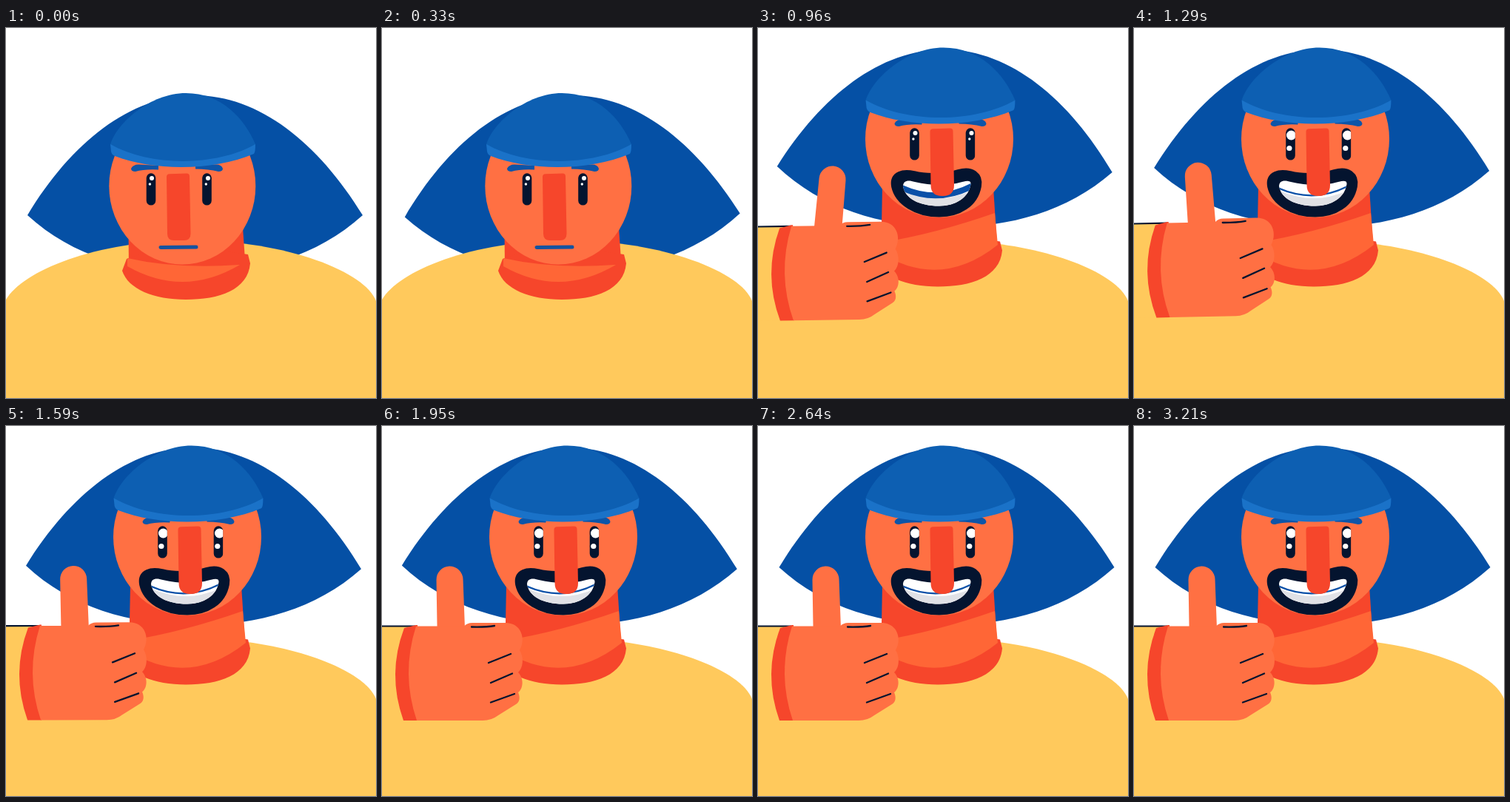
These frames come from a looping animation (500x500 px, 3.24 s). An HTML page:

```html
<!DOCTYPE html>
<html lang="en">
<head>
<meta charset="utf-8">
<title>Thumbs up</title>
<style>
  html, body { margin: 0; width: 100%; height: 100%; overflow: hidden; background: #fff; }
  svg { display: block; width: 100%; height: 100%; }
</style>
</head>
<body>
<svg viewBox="0 0 500 500" fill="none" stroke-linecap="round" stroke-linejoin="round">
  <defs>
    <clipPath id="eyeShape">
      <rect x="189.7" y="196.3" width="12.6" height="43.2" rx="6.3"/>
      <rect x="265.2" y="196.3" width="12.6" height="43.2" rx="6.3"/>
    </clipPath>
    <clipPath id="teethShape">
      <path d="M196 214C196 206 203 205 212 208C232 213 252 213 268 210C282 206 288 205 287.5 211C285 229 267 240.5 245 240.5C217 240.5 199 230 196 214Z"/>
    </clipPath>
  </defs>

  <path id="hair" fill="#0550a5" d="M29 253C88 155 168 91 255 91S422 155 482 253C420 309 340 331 255 331S90 309 29 253Z"/>
  <path fill="#ffc95c" d="M0 367C22 329 120 287 250 287S486 330 500 369V500H0Z"/>
  <path id="neck" fill="#f6462b"/>
  <path id="collar" fill="#f6462b" d="M163 312L157 328C165 353 200 367 243 367C288 367 327 354 330 318L327 306L300 302H190Z"/>
  <path id="neckLight" fill="#ff6636"/>
  <ellipse id="face" fill="#ff7043"/>

  <g id="features">
    <g fill="#0d55a8">
      <path d="M169 190Q172 184 180 184.5L206 186V191.5Q187 190.5 175 194Q169 194 169 190Z"/>
      <path d="M293 190Q291 184 283 184.5L256 185V190.5Q274 190.5 287 194Q293 194 293 190Z"/>
    </g>
    <g clip-path="url(#eyeShape)">
      <path fill="#04142f" d="M185 190H285V245H185Z"/>
      <g fill="#fff">
        <circle class="glint" cx="197"/><circle class="spark" cx="194.4"/>
        <circle class="glint" cx="273"/><circle class="spark" cx="270.3"/>
      </g>
    </g>
    <path id="frown" stroke="#1453a0" stroke-width="5" d="M209 296.5L257 296"/>
  </g>

  <g id="smile">
    <path fill="#04142f" stroke="#04142f" stroke-width="16" d="M188 213C186 201 196 198 210 201C230 206 255 204 272 199C288 194 296 202 294 213C290 235 270 247.500 245 247.500C215 247.500 192 232 188 213Z"/>
    <g clip-path="url(#teethShape)">
      <path fill="#fff" d="M180 190H305V260H180Z"/>
      <path fill="#e0e1e6" d="M180 211Q243 249 305 211V260H180Z"/>
      <path id="lip" stroke="#0a50a8" d="M190 214Q243 240 294 211"/>
    </g>
  </g>

  <path id="nose" fill="#f6462b"/>

  <g id="hat">
    <path fill="#1a72c8" d="M141 157L142 167Q143 171.500 147 173C200 193.500 280 193.500 335 170Q337 168 337 157Z"/>
    <path fill="#0d5fb2" d="M141 157C150 128 195 88 243 88S322 122 337 157C285 187 195 188 141 157Z"/>
  </g>

  <g id="arm">
    <path fill="#ffc95c" d="M-30 270.500H46V398H-30Z"/>
    <path stroke="#04142f" stroke-width="2.2" d="M-30 270.500H45"/>
    <path fill="#f6462b" d="M46 269L30 273Q6.5 335 29 398H48V269Z"/>
    <path id="thumb" fill="#ff7043" d="M75 300L73.5 208A18 18 0 0 1 109.500 207L113 300Z"/>
    <path fill="#ff7043" d="M46 270.500H111Q115 266 122 266H165C188 265 195 287 186 303C192 312 191 327 184 333C192 341 191 355 184 360C187 367 186 373 181 376L157 391Q148 398 136 398H47Q25.500 335 46 270.500Z"/>
    <path stroke="#04142f" stroke-width="2.3" d="M121 271.500Q140 272 152 270M144 320L174 308M147 347L176 334.500M147 373.500L179 362"/>
  </g>
</svg>

<script>
const LOOP = 3240;
const $ = id => document.getElementById(id);
const set = (id, attrs) => {
  for (const name in attrs) $(id).setAttribute(name, attrs[name]);
};
const setCircles = (selector, cy, r) => document.querySelectorAll(selector).forEach(c => {
  c.setAttribute('cy', cy);
  c.setAttribute('r', r);
});
const mix = (a, b, p) => a + (b - a) * p;

// Eased value at time t through [time, value] pairs.
function track(t, keys) {
  if (t <= keys[0][0]) return keys[0][1];
  for (let i = 1; i < keys.length; i++) {
    const [t0, v0] = keys[i - 1], [t1, v1] = keys[i];
    if (t < t1) {
      const u = (t - t0) / (t1 - t0);
      return mix(v0, v1, u * u * (3 - 2 * u));
    }
  }
  return keys[keys.length - 1][1];
}

function nosePath(p) {
  const r = mix(9, 15, p);
  const bottom = mix(287, 288, p);
  return `M217 201Q217 197.500 221 197.300L244 196.500Q248 196.500 248 200.500L249.500 ${bottom - r}` +
    `Q249.500 ${bottom} ${249.5 - r} ${bottom}L${218 + r} ${bottom}Q218 ${bottom} 218 ${bottom - r}Z`;
}

function draw(t) {
  const rise = track(t, [[740, 0], [930, 1]]);
  const shine = track(t, [[960, 0], [1140, 1]]);
  const sway = track(t, [[0, 0], [600, -1.1], [720, -1.1], [960, 1], [1290, 0.5], [1950, 0.6], [2500, 0]]);
  const m = (a, b) => mix(a, b, rise);

  set('hair', { transform: `translate(${-0.5 * rise} ${-62 * rise}) rotate(${sway} 255 95)` });
  set('neck', { d: `M${m(165.5, 168)} ${m(270, 215)}L166 ${m(330, 318)}H319L323 ${m(313, 293)}L${m(319, 318)} ${m(255, 215)}Z` });
  set('collar', { transform: `translate(0 ${-17.5 * rise})` });
  set('neckLight', {
    d: `M${m(164, 166)} ${m(311, 290)}Q${m(230, 240)} ${m(326, 278)} ${m(315, 320)} ${m(320, 250)}` +
       `L${m(316, 324)} ${m(320, 293)}Q${m(240, 246)} ${m(365, 355)} 164 ${m(322, 303)}Z`
  });
  set('face', { cx: m(238.3, 245), cy: m(213.5, 150), rx: m(99, 100), ry: 106 });
  set('hat', { transform: `translate(${m(239, 246.5)} ${m(157, 97.5)}) scale(${m(1, 1.03)}) translate(-239 -157)` });

  const shift = `translate(${15.5 * rise} ${-61 * rise})`;
  set('features', { transform: shift });
  set('nose', { transform: shift, d: nosePath(rise) });
  setCircles('.glint', mix(203, 206, shine), mix(3, 6.5, shine));
  setCircles('.spark', mix(211, 223.5, shine), mix(1.7, 3.6, shine));

  const smiling = rise > 0.35;
  const open = Math.min(1, mix(0.3, 1, (rise - 0.35) / 0.65));
  set('frown', { visibility: smiling ? 'hidden' : 'visible' });
  set('smile', {
    visibility: smiling ? 'visible' : 'hidden',
    transform: `translate(${m(225.500, 241)} ${m(285, 224)}) scale(${open}) translate(-241 -224)`
  });
  set('lip', { 'stroke-width': mix(8, 2.3, shine) });

  const lift = track(t, [[735, 250], [945, -2], [960, -2], [1290, -6], [1650, 0]]);
  const tilt = track(t, [[735, 8], [945, -0.8], [1290, -1.2], [1650, 0]]);
  const thumb = track(t, [[735, 35], [960, 7.5], [1290, -1.5], [1650, 0]]);
  set('arm', {
    visibility: t < 735 ? 'hidden' : 'visible',
    transform: `translate(0 ${lift}) rotate(${tilt} 0 330)`
  });
  set('thumb', { transform: `rotate(${thumb} 94 290)` });
}

const start = performance.now();
function tick() {
  draw((performance.now() - start) % LOOP);
  requestAnimationFrame(tick);
}
tick();
</script>
</body>
</html>
```
